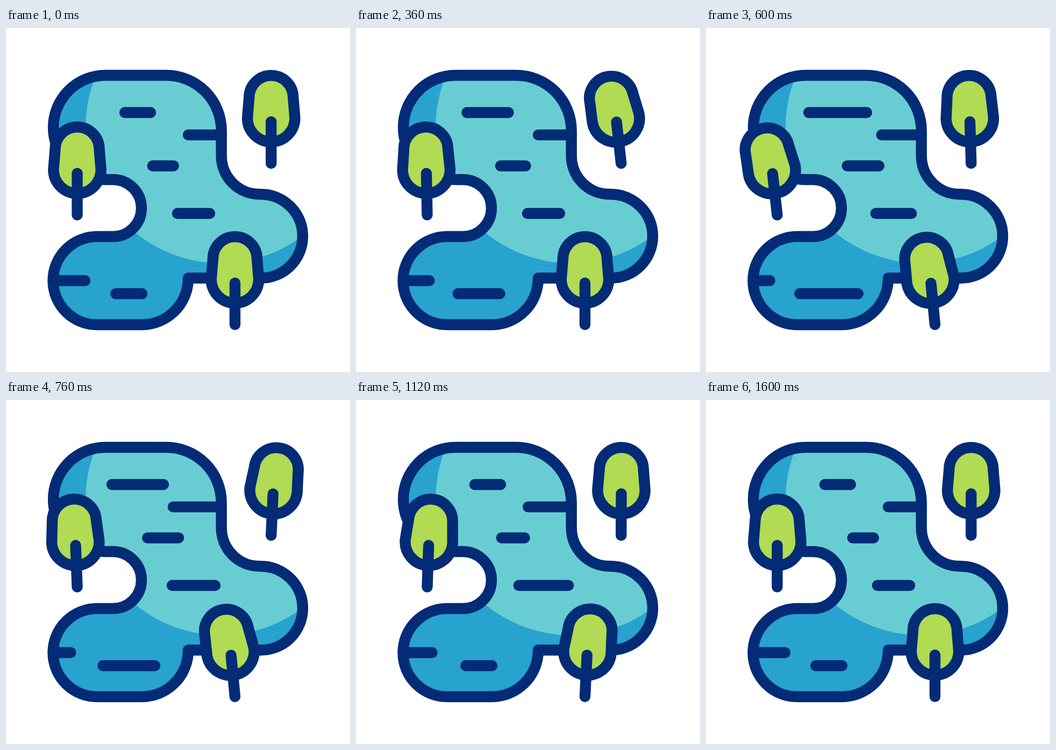
Write an HTML page that moves like this. It is 640x640 px and loops after 1760 ms.

```html
<!DOCTYPE html>
<html lang="en">
<head>
<meta charset="utf-8">
<title>Lake and trees</title>
<style>
  html, body { margin: 0; height: 100%; overflow: hidden; background: #fff; }
  svg { display: block; width: 100vw; height: 100vh; }
  .line { fill: none; stroke: #032b76; stroke-width: 20.4; stroke-linecap: round; stroke-linejoin: round; }
  .line.leaf { fill: #b1db52; }
</style>
</head>
<body>
<svg viewBox="0 0 640 640">
  <defs>
    <path id="lake" d="M185 88H298A102.7 102.7 0 0 1 400.7 190.7V238A71.3 71.3 0 0 0 472 309.3H474A78 78 0 0 1 474 465.3H339A86.5 86.5 0 0 1 253 552H169.5A82 82 0 0 1 169.5 388H199A53 53 0 0 0 199 282H185A97 97 0 0 1 185 88Z"/>
    <clipPath id="shore"><use href="#lake"/></clipPath>
  </defs>
  <use href="#lake" fill="#28a2cf"/>
  <circle cx="400" cy="185.5" r="252" fill="#68cdd2" clip-path="url(#shore)"/>
  <use href="#lake" class="line"/>
  <g id="ripples"></g>
  <g id="trees"></g>
</svg>
<script>
const LOOP = 1760, STEP = 40;

// Values at key times, eased smoothly between them
function track(keys, t) {
  let [t0, v0] = keys[0];
  if (t <= t0) return v0;
  for (const [t1, v1] of keys) {
    if (t < t1) {
      const p = (t - t0) / (t1 - t0);
      return v0 + (v1 - v0) * p * p * (3 - 2 * p);
    }
    [t0, v0] = [t1, v1];
  }
  return v0;
}

function add(parent, tag, attrs) {
  const el = document.createElementNS("http://www.w3.org/2000/svg", tag);
  for (const name in attrs) el.setAttribute(name, attrs[name]);
  return parent.appendChild(el);
}

const pulse = (start, peak, end) => [[start, 0], [peak, 1], [end, 0]];
const early = pulse(113, 616, 1118);
const middle = pulse(160, 645, 1305);

// left, right: how far each end travels at the peak
const ripples = [
  { x1: 221, x2: 269, y: 157.2, left: -30, right: 30, beat: early },
  { x1: 204.3, x2: 253, y: 494.2, left: -30, right: 30, beat: early },
  { x1: 339, x2: 400.7, y: 198.9, left: -33, right: 0, beat: pulse(405, 875, 1415) },
  { x1: 272.8, x2: 311.7, y: 256.5, left: -10.3, right: 10.3, beat: middle },
  { x1: 88, x2: 147, y: 470, left: 0, right: -29, beat: middle },
  { x1: 319, x2: 379, y: 345, left: -17.6, right: 17.6, beat: pulse(446, 1020, 1594) }
];
const ripplesGroup = document.getElementById("ripples");
for (const r of ripples) {
  r.el = add(ripplesGroup, "line", { class: "line", y1: r.y, y2: r.y });
}

// Each tree stands on its own origin, the foot of the trunk
const TRUNK = 77.3;
const trunkSway = [[110, 0], [390, -6.6], [800, 2.9], [1180, 0]];
const crownSway = [[135, 0], [405, -13], [780, 7.7], [1160, 0]];
const trees = [
  { x: 493.3, y: 251.8, delay: 0 },
  { x: 132.5, y: 347.8, delay: 175 },
  { x: 426, y: 551.8, delay: 280 }
];
const treesGroup = document.getElementById("trees");
for (const tree of trees) {
  tree.el = add(treesGroup, "g");
  tree.crown = add(tree.el, "path", {
    class: "line leaf",
    d: "M-41 -122.6A41 41 0 0 1 41 -122.6L44.2 -84.2A44.2 44.2 0 0 1 -44.2 -84.2Z"
  });
  add(tree.el, "path", { class: "line", d: `M0 0V${-TRUNK}` });
}

function draw(t) {
  for (const r of ripples) {
    const amount = track(r.beat, t);
    r.el.setAttribute("x1", r.x1 + r.left * amount);
    r.el.setAttribute("x2", r.x2 + r.right * amount);
  }
  for (const tree of trees) {
    const lean = track(trunkSway, t - tree.delay);
    const bend = track(crownSway, t - tree.delay) - lean;
    tree.el.setAttribute("transform", `translate(${tree.x} ${tree.y}) rotate(${lean})`);
    tree.crown.setAttribute("transform", `rotate(${bend} 0 ${-TRUNK})`);
  }
}

const begin = performance.now();
function tick() {
  const t = (performance.now() - begin) % LOOP;
  draw(Math.floor(t / STEP) * STEP);
  requestAnimationFrame(tick);
}
tick();
</script>
</body>
</html>
```
